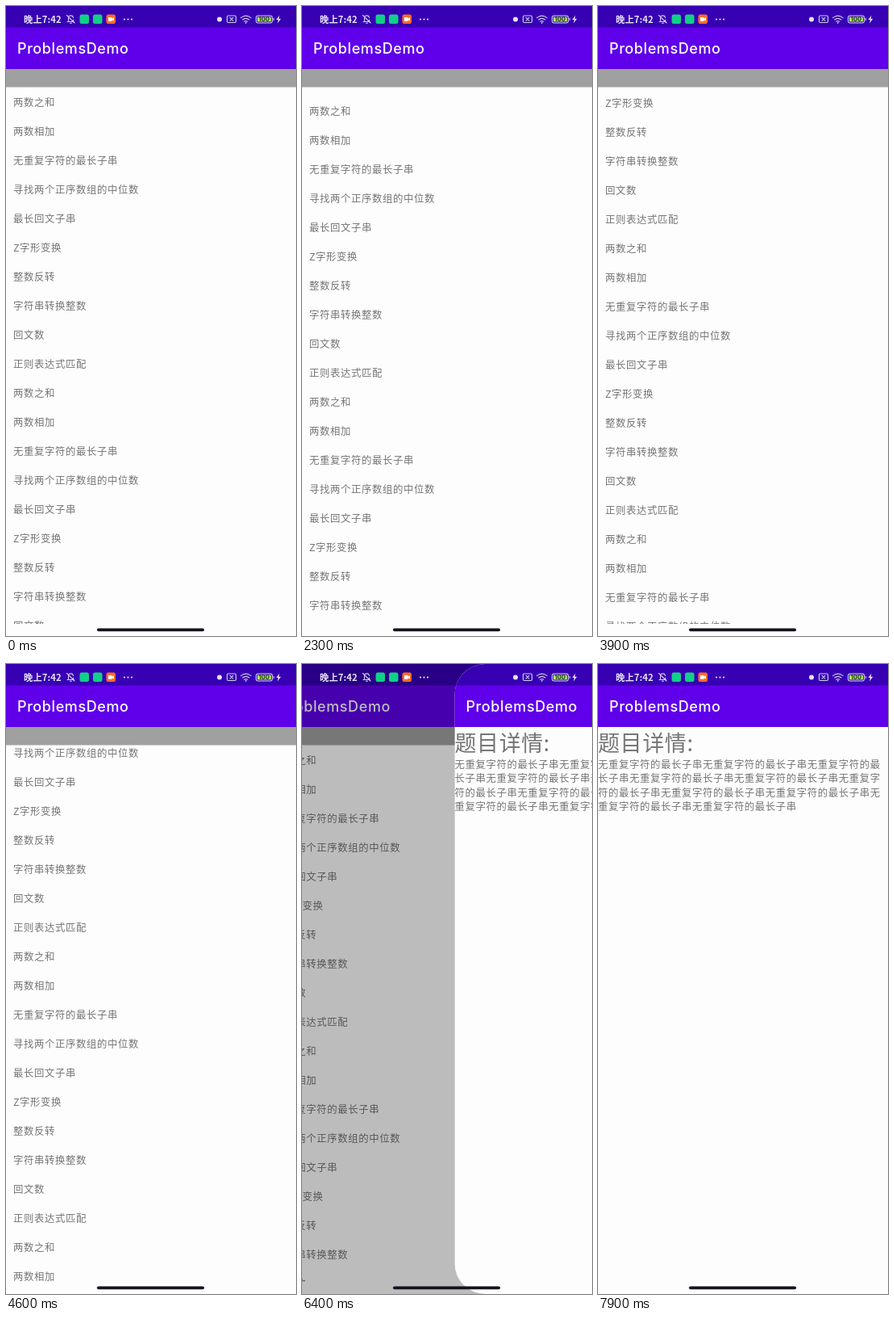
Recreate the animation shown at these times as an HTML page. Size 360 px wide and 780 px high, loop 8000 ms.

```html
<!DOCTYPE html>
<html lang="zh-CN">
<head>
<meta charset="utf-8">
<title>ProblemsDemo</title>
<style>
  html, body { margin: 0; width: 100%; height: 100%; overflow: hidden; background: #000; }
  svg { display: block; width: 100%; height: 100%; }
  text { font-family: "Noto Sans CJK SC", "Noto Sans CJK", "Noto Sans", sans-serif; }
  .bar { font: 500 18px Inter, sans-serif; letter-spacing: .6px; fill: #fff; }
  .row { font-size: 12.4px; letter-spacing: .6px; fill: #757575; }
  .head { font-size: 27px; letter-spacing: .6px; fill: #757575; }
  .clock { font-size: 11.3px; font-weight: 700; letter-spacing: .1px; fill: #e6e2f6; }
  .level { font: 700 7.5px Inter, sans-serif; fill: #26331a; text-anchor: middle; }
  .line { fill: none; stroke: #d4cdf0; stroke-width: 1.1; stroke-linecap: round; stroke-linejoin: round; }
</style>
</head>
<body>
<svg viewBox="0 0 360 780" preserveAspectRatio="none">
  <defs>
    <clipPath id="listClip"><rect y="100" width="360" height="665"/></clipPath>
    <clipPath id="pageClip"><rect id="pageShape" width="360" height="780"/></clipPath>
    <g id="chrome">
      <rect width="360" height="780" fill="#fdfdfe"/>
      <rect width="360" height="27" fill="#3700b3"/>
      <rect y="26.5" width="360" height="51.5" fill="#6000ea"/>
      <text class="bar" x="14" y="59">ProblemsDemo</text>
    </g>
  </defs>

  <rect width="360" height="780"/>
  <g id="home">
    <use href="#chrome"/>
    <rect y="78" width="360" height="22.5" fill="#a0a0a0"/>
    <g clip-path="url(#listClip)"><g id="list"></g></g>
    <rect id="dim" width="360" height="780" opacity="0"/>
  </g>

  <g id="detail">
    <g clip-path="url(#pageClip)">
      <use href="#chrome"/>
      <text class="head" x="0" y="107.5">题目详情:</text>
      <g id="body"></g>
    </g>
  </g>

  <g id="status">
    <text class="clock" x="22" y="20.5">晚上7:42</text>
    <path class="line" d="M76 19.5h8.5M77.5 19v-3.5a3 3 0 0 1 3-3.6c1.5 0 2.7 1 2.9 2.6M83.5 17v2M79.5 21.3h2M75.5 11.5l9.5 9.5"/>
    <rect x="91.5" y="10.5" width="11.5" height="11.5" rx="2.5" fill="#12cf88"/>
    <rect x="108" y="10.5" width="11.5" height="11.5" rx="2.5" fill="#12cf88"/>
    <rect x="124.5" y="10.5" width="11.5" height="11.5" rx="2.5" fill="#ff6a2a"/>
    <path d="M127 14h4.5v1.5l2.5-1.3v4.3l-2.5-1.3v1.5h-4.500z" fill="#fff"/>
    <g fill="#e6e2f6">
      <circle cx="147" cy="16.5" r="1.1"/>
      <circle cx="151.5" cy="16.5" r="1.1"/>
      <circle cx="156" cy="16.5" r="1.1"/>
      <circle cx="265" cy="16.5" r="3"/>
    </g>
    <rect class="line" x="274.5" y="12" width="11" height="8.5" rx="1.5"/>
    <path class="line" d="M278.2 14.5l3.6 3.6M281.8 14.5l-3.6 3.6"/>
    <path class="line" d="M291.5 14.7q6.3-5.2 12.6 0M293.7 17q4.1-3.3 8.2 0M295.8 19.2q2-1.5 4 0"/>
    <circle cx="297.8" cy="20.8" r="1" fill="#d4cdf0"/>
    <rect class="line" x="310.5" y="12" width="20" height="9" rx="2.5"/>
    <rect x="312" y="13.4" width="17" height="6.2" rx="1.3" fill="#a5e36c"/>
    <path class="line" d="M332.3 15.3v2.4"/>
    <text class="level" x="320.5" y="19.2">100</text>
    <path d="M339.5 11.5l-4 5.6h2.5l-1 4.4 4.3-5.8h-2.7z" fill="#e6e2f6"/>
    <rect x="113" y="770.5" width="133" height="3.7" rx="1.85" fill="#14141f"/>
  </g>
</svg>

<script>
const LOOP = 8000, STEP = 100, ROW = 36;
const topics = ["两数之和", "两数相加", "无重复字符的最长子串", "寻找两个正序数组的中位数",
  "最长回文子串", "Z字形变换", "整数反转", "字符串转换整数", "回文数", "正则表达式匹配"];
const $ = id => document.getElementById(id);

function addText(parent, text, x, y) {
  const node = document.createElementNS("http://www.w3.org/2000/svg", "text");
  node.setAttribute("class", "row");
  node.setAttribute("x", x);
  node.setAttribute("y", y);
  node.textContent = text;
  parent.appendChild(node);
}

for (let i = 0; i < 40; i++) addText($("list"), topics[i % topics.length], 9, 123.7 + i * ROW);

const story = topics[2].repeat(10);
for (let i = 0; i < 4; i++) addText($("body"), story.slice(i * 27, i * 27 + 27), 0, 128.7 + i * 17.4);

// [time, scrolled distance]: fling that slows, second drag, fling back to the top
const scroll = [[500, 0], [1300, 225], [2300, 349], [3100, 392], [3900, 539], [4900, 0]];

// Monotone cubic through the keys, so speed stays continuous
const slope = i => (scroll[i + 1][1] - scroll[i][1]) / (scroll[i + 1][0] - scroll[i][0]);
function tangent(i) {
  if (i === 0 || i === scroll.length - 1) return 0;
  const a = slope(i - 1), b = slope(i);
  return a * b > 0 ? 2 * a * b / (a + b) : 0;
}
function scrolled(t) {
  const i = scroll.findIndex(key => t < key[0]) - 1;
  if (i < 0) return 0;
  const [t0, y0] = scroll[i], [t1, y1] = scroll[i + 1];
  const d = t1 - t0, u = (t - t0) / d, v = 1 - u;
  return y0 + (y1 - y0) * u * u * (3 - 2 * u) + d * u * v * (tangent(i) * v - tangent(i + 1) * u);
}

const slide = t => t <= 6300 ? 360 : 360 * Math.exp(-5.9 * ((t - 6300) / 400) ** 1.6);
const shift = (id, x, y = 0) => $(id).setAttribute("transform", `translate(${x.toFixed(2)} ${y.toFixed(2)})`);

function draw(t) {
  const x = t >= 6800 ? 0 : slide(t);
  const open = 1 - x / 360;
  shift("list", 0, -scrolled(t));
  shift("home", -90 * open);
  shift("detail", x);
  $("dim").setAttribute("opacity", 0.55 * open);
  $("pageShape").setAttribute("rx", t < 6900 ? 38 : 0);
}

function tick() {
  const t = performance.now() % LOOP;
  draw(Math.floor(t / STEP) * STEP);
  requestAnimationFrame(tick);
}
tick();
</script>
</body>
</html>
```
